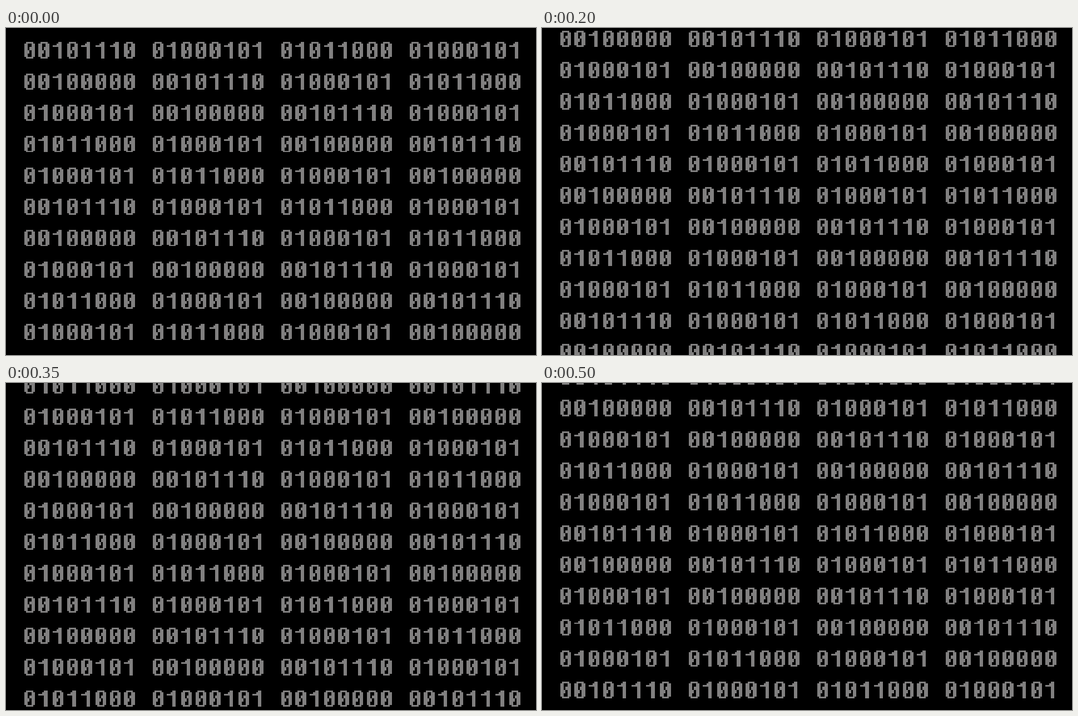
Recreate the animation shown at these times as an HTML page with a canvas. Size 953 by 588 pixels, loop 550 ms.

```html
<!DOCTYPE html>
<html>
<head>
<meta charset="utf-8">
<style>
html, body { margin: 0; height: 100%; overflow: hidden; background: #000; }
canvas { display: block; }
</style>
</head>
<body>
<canvas id="stage" width="953" height="588"></canvas>
<script>
const ctx = document.getElementById('stage').getContext('2d');
const WORDS = ['00101110', '00100000', '01000101', '01011000', '01000101'];
const GLYPHS = [
  ['.####.', '##..##', '##..##', '##.###', '##.###', '###.##', '###.##', '##..##', '##..##', '.####.'],
  ['...##', '..###', '#####', '...##', '...##', '...##', '...##', '...##', '...##', '...##']
];
// Size of one font pixel, and the layout on the stage
const PX = 3.208, PY = 2.92;
const LEFT = 32.8, TOP = 25.3;
const DIGIT = 8 * PX, COLUMN = 9 * DIGIT;
const LINE = 56.33, STEP_MS = 50, STEPS = 11;
const SCROLL = LINE * 10 / STEPS;

function drawDigit(digit, x, y) {
  GLYPHS[digit].forEach((line, row) => {
    const top = Math.round(y + row * PY), bottom = Math.round(y + (row + 1) * PY);
    for (const run of line.matchAll(/#+/g)) {
      const left = Math.round(x + run.index * PX);
      const right = Math.round(x + (run.index + run[0].length) * PX);
      ctx.fillRect(left, top, right - left, bottom - top);
    }
  });
}

function draw(time) {
  const step = Math.floor(time / STEP_MS) % STEPS;
  ctx.fillStyle = '#000';
  ctx.fillRect(0, 0, 953, 588);
  ctx.fillStyle = '#818080';
  for (let row = -11; row < 11; row++) {
    const y = TOP + row * LINE + step * SCROLL;
    if (y < -LINE || y > 588) continue;
    for (let col = 0; col < 4; col++) {
      const word = WORDS[(row - col + 20) % 5];
      [...word].forEach((digit, i) => drawDigit(digit, LEFT + col * COLUMN + i * DIGIT, y));
    }
  }
}

function tick() {
  draw(performance.now());
  requestAnimationFrame(tick);
}
tick();
</script>
</body>
</html>
```
